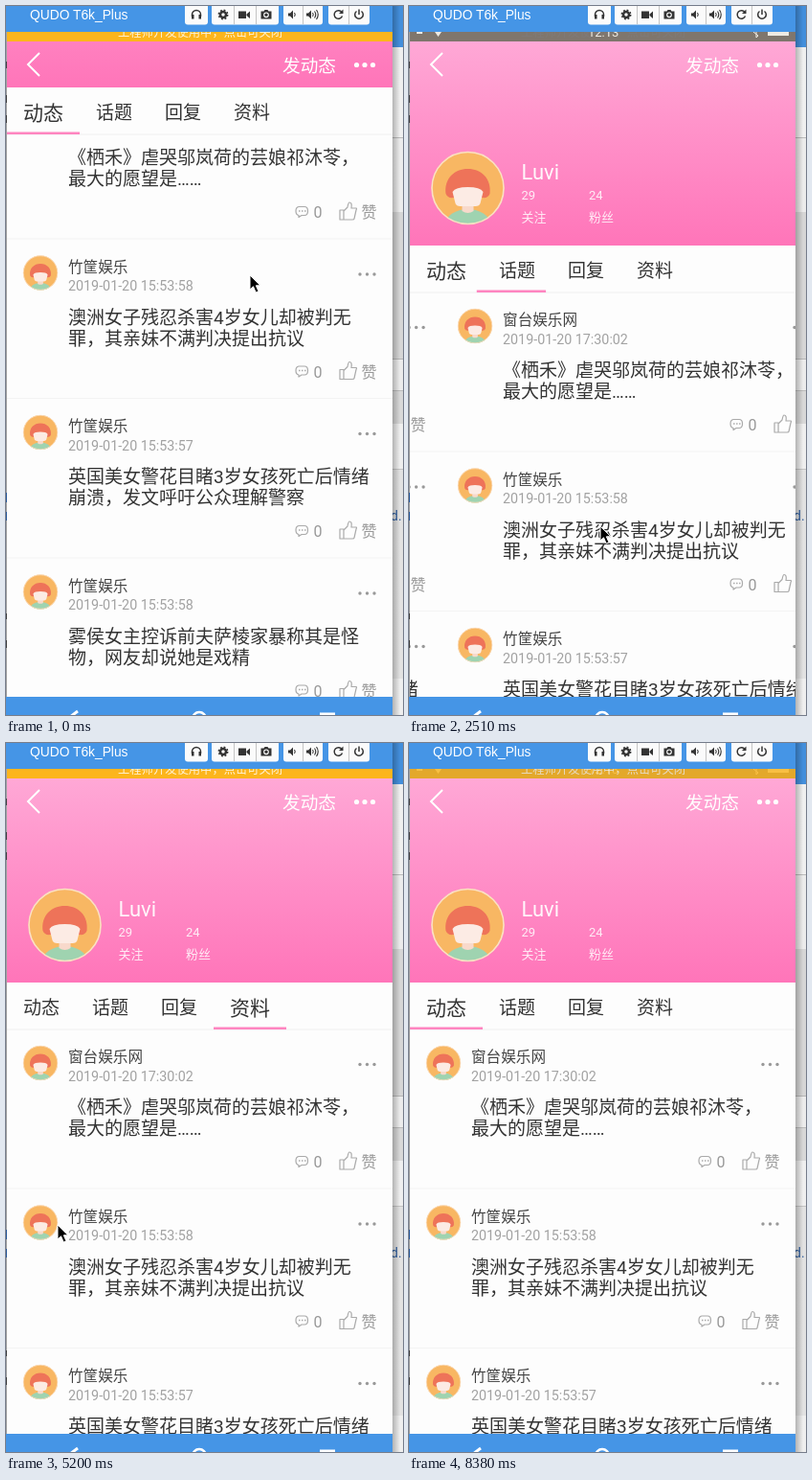
Animation of 415 by 740 pixels, one loop 8480 ms. Source, as an HTML page:

```html
<!DOCTYPE html>
<html lang="zh-CN">
<head>
<meta charset="utf-8">
<title>动态页</title>
<style>
html, body { margin: 0; width: 100%; height: 100%; overflow: hidden; background: #e9e9e9; }
svg { display: block; width: 415px; height: 740px; }
text { font-family: Roboto, "Noto Sans CJK SC", "Noto Sans CJK", sans-serif; }
.device { font: 13.8px "Liberation Sans", Arial, sans-serif; fill: #fff; }
.name { font-size: 15.6px; fill: #444; }
.date { font-size: 14.3px; fill: #a2a2a2; }
.title { font-size: 19px; fill: #333; }
.meta { fill: #999; font-size: 16px; }
.tab { fill: #333; font-size: 19px; }
.info { fill: #fff; fill-opacity: .85; font-size: 13px; }
.line { fill: none; stroke: #aaa; stroke-width: 1.2; stroke-linejoin: round; }
.btn { fill: #fbfbfb; }
.ico { fill: none; stroke: #333; stroke-width: 1.5; }
.solid { fill: #333; }
</style>
</head>
<body>
<svg viewBox="0 0 415 740" xmlns="http://www.w3.org/2000/svg">
  <defs>
    <linearGradient id="pink" x1="0" y1="0" x2="0" y2="1">
      <stop offset="0" stop-color="#ffa8d6"/>
      <stop offset="1" stop-color="#ff75b9"/>
    </linearGradient>
    <linearGradient id="shade">
      <stop offset="0" stop-opacity=".25"/>
      <stop offset="1" stop-opacity="0"/>
    </linearGradient>
    <clipPath id="screen"><path d="M1 27H404V721H1z"/></clipPath>
    <clipPath id="below"><path d="M1 37H404V721H1z"/></clipPath>
    <clipPath id="round"><circle r="38"/></clipPath>
    <g id="face">
      <circle r="38" fill="#f8b763"/>
      <g clip-path="url(#round)">
        <ellipse cy="37" rx="23" ry="15" fill="#9fd3b0"/>
        <path d="M-6 14H6V24Q0 28-6 24z" fill="#f8d9cb"/>
        <path d="M-23 6C-25-10-14-20 0-20S25-10 23 6Q21 11 15 10H-15Q-21 11-23 6z" fill="#ee7359"/>
        <path d="M-16 4Q-13-1 0-1T16 4L13 16Q12 19 8 19H-8Q-12 19-13 16z" fill="#fcebe4"/>
      </g>
      <circle r="37.5" fill="none" stroke="#fbe0c4" stroke-width="1.6"/>
    </g>
    <g id="actions">
      <path class="line" d="M306 132.500h6q3.500 0 3.500 4.500t-3.500 4.500h-3l-3 2v-2q-3-.5-3-4.500t3-4.500z"/>
      <path d="M306 137h1.500m1.500 0h1.500m1.500 0h1.500" stroke="#aaa" stroke-width="1.300"/>
      <text class="meta" x="321.500" y="144">0</text>
      <path class="line" d="M349 136h4v10h-4zM353 137l4-4q1-5 2-5q3 0 2 6h5q1 0 0 2l-2 9q0 1-2 1h-9"/>
      <text class="meta" x="371.500" y="144">赞</text>
      <g fill="#999"><circle cx="370" cy="36.500" r="1.700"/><circle cx="377.500" cy="36.500" r="1.700"/><circle cx="385" cy="36.500" r="1.700"/></g>
    </g>
  </defs>

  <!-- page behind the device window -->
  <g id="backdrop"></g>
  <text x="402" y="537" font-size="14" fill="#2f5f9f">d.</text>
  <path d="M404 0h8V740h-8z" fill="url(#shade)"/>
  <path d="M.5 27V721" stroke="#a3a3a3"/>
  <path d="M.5 58v7m0 28v8m0 13v8m0 512v6m0 22v8" stroke="#444"/>
  <path d="M.5 508v10m0 10v9" stroke="#2f5f9f"/>

  <path d="M0 0H404V27H0z" fill="#4595e6"/>
  <text class="device" x="25" y="14">QUDO T6k_Plus</text>
  <g class="btn">
    <rect x="187" y="-5" width="24" height="24.500" rx="3"/>
    <rect x="215" y="-5" width="70" height="24.500" rx="3"/>
    <rect x="290" y="-5" width="41" height="24.500" rx="3"/>
    <rect x="337" y="-5" width="43" height="24.500" rx="3"/>
  </g>
  <path d="M238.500 0V19M261.500 0V19M310.500 0V19M358.500 0V19" stroke="#c4c4c4"/>
  <path class="ico" d="M194.500 11V9a4.500 4.500 0 0 1 9 0v2"/>
  <path class="solid" d="M194 9h2.500v4.500H194zM201.500 9h2.500v4.500h-2.500z"/>
  <circle class="ico" cx="227" cy="9" r="3" style="stroke-width:2.500"/>
  <circle class="ico" cx="227" cy="9" r="4.700" stroke-dasharray="1.850 1.850"/>
  <path class="solid" d="M243 5.500h8v7.500h-8zM251.500 8.500l3.500-3v7.500l-3.500-3zM266.500 5.500h3l1-1.500h3l1 1.500h3V13.500h-11z"/>
  <circle cx="272" cy="9.300" r="2.300" fill="#333" stroke="#fff" stroke-width="1.100"/>
  <path class="solid" d="M295 7.500h2l3-3v9l-3-3h-2zM314 7.500h2l3-3v9l-3-3h-2z"/>
  <path class="ico" d="M301.500 7q1.500 2 0 4M320.500 7q1.500 2 0 4M322.500 5.500q2.500 3.500 0 7M324.500 4q3.500 5 0 10" style="stroke-width:1.100"/>
  <path class="ico" d="M351 6.500a4.300 4.300 0 1 0 .5 4"/>
  <path class="solid" d="M352.500 3.500v4.500H348z"/>
  <path class="ico" d="M366.500 5.500a4.300 4.300 0 1 0 5 0M369 3.500v5.500"/>

  <g clip-path="url(#screen)">
    <path d="M1 27H404V721H1z" fill="#fdfdfd"/>
    <g clip-path="url(#below)">
      <g id="list"></g>
      <rect id="head" x="1" width="403" fill="url(#pink)"/>
      <g id="profile">
        <use href="#face" x="61.500" y="190"/>
        <text x="117.500" y="181" font-size="22" fill="#fff" fill-opacity=".92">Luvi</text>
        <text class="info" x="117.500" y="201.500">29</text>
        <text class="info" x="188" y="201.500">24</text>
        <text class="info" x="117.500" y="225">关注</text>
        <text class="info" x="188" y="225">粉丝</text>
      </g>
      <g id="tabs">
        <path d="M1 250H404V299H1z" fill="#fdfdfd"/>
        <path d="M1 299H404" stroke="#f0f0f0"/>
        <rect id="bar" y="296.500" height="2.500" fill="#ff85c0"/>
      </g>
      <path d="M35 49L23 61L35 73" fill="none" stroke="#fff" stroke-width="2"/>
      <text x="289" y="69" font-size="18.700" fill="#fff">发动态</text>
      <g fill="#fff"><circle cx="366.500" cy="61.500" r="2.600"/><circle cx="375" cy="61.500" r="2.600"/><circle cx="383.500" cy="61.500" r="2.600"/></g>
    </g>
    <g>
      <path d="M1 27H404V37H1z" fill="#787372"/>
      <text x="187" y="31.500" font-size="13" fill="#eee">12:13</text>
      <path d="M375 27h22v4h-22zM8 27h6v2H8zM27 27h7l-3.500 5z" fill="#eee"/>
      <path d="M360 27l5 4-2 2V27" fill="none" stroke="#eee"/>
    </g>
    <g id="notice">
      <path d="M1 27H404V37H1z" fill="#fcb51c"/>
      <text x="117" y="31.500" font-size="12.300" fill="#fff3d6">工程师开发使用中，点击可关闭</text>
    </g>
  </g>

  <path d="M0 721H404V740H0z" fill="#4595e6"/>
  <path d="M75 736l-8 6l8 6" fill="none" stroke="#fff" stroke-width="3"/>
  <circle cx="202" cy="744" r="7" fill="none" stroke="#fff" stroke-width="2.500"/>
  <path d="M328 737.500H344V740H328z" fill="#fff"/>
  <path id="cursor" d="M0 0V15L3.500 11.800L6.200 18L9 16.800L6.300 10.800H11z" fill="#000" stroke="#fff"/>
</svg>
<script>
const $ = id => document.getElementById(id);
const LOOP = 8480, PAGE = 403, PITCH = 166.5, COLLAPSE = 165, SCROLL = 222;

// [bottom edge, colour] of the strip to the right
let edge = 0;
$('backdrop').innerHTML = [
  [43, '#438fdc'], [137, '#f0f0f0'], [138, '#bbb'], [215, '#ececec'],
  [368, '#d6d6d6'], [369, '#b5b5b5'], [401, '#ececec'], [402, '#bbb'], [436, '#d8d8d8'],
  [483, '#efefef'], [484, '#c4c4c4'], [702, '#e2e2e2'], [740, '#efefef']
].map(([end, fill]) => {
  const row = `<rect x="404" y="${edge}" width="11" height="${end - edge}" fill="${fill}"/>`;
  edge = end;
  return row;
}).join('');

const posts = [
  ['窗台娱乐网', '17:30:02', '《栖禾》虐哭邬岚荷的芸娘祁沐苓，', '最大的愿望是……'],
  ['竹筐娱乐', '15:53:58', '澳洲女子残忍杀害4岁女儿却被判无', '罪，其亲妹不满判决提出抗议'],
  ['竹筐娱乐', '15:53:57', '英国美女警花目睹3岁女孩死亡后情绪', '崩溃，发文呼吁公众理解警察'],
  ['竹筐娱乐', '15:53:58', '雾侯女主控诉前夫萨棱家暴称其是怪', '物，网友却说她是戏精']
];
const post = ([name, time, a, b], i) => `<g transform="translate(0 ${299 + i * PITCH})">
  <use href="#face" transform="translate(36 35) scale(.474)"/>
  <text class="name" x="65" y="34">${name}</text>
  <text class="date" x="65" y="53.5">2019-01-20 ${time}</text>
  <text class="title" x="65" y="88">${a}</text>
  <text class="title" x="65" y="110">${b}</text>
  <use href="#actions"/>
  <path d="M1 166H404" stroke="#f3f3f3"/></g>`;
const feed = posts.map(post).join('');
$('list').innerHTML = [0, 1, 2, 3].map(i => `<g transform="translate(${i * PAGE} 0)">${feed}</g>`).join('');

const labels = ['动态', '话题', '回复', '资料'].map(s => {
  const el = document.createElementNS('http://www.w3.org/2000/svg', 'text');
  el.textContent = s;
  el.setAttribute('class', 'tab');
  $('tabs').append(el);
  return el;
});

const clamp = (v, a = 0, b = 1) => Math.min(b, Math.max(a, v));
const smooth = u => u * u * (3 - 2 * u);
const linear = u => u;

// keys: [time, value...]; value held before the first and after the last
function track(keys, t, ease = smooth) {
  const n = keys.findIndex(k => k[0] > t);
  if (n === 0) return keys[0].slice(1);
  if (n < 0) return keys.at(-1).slice(1);
  const a = keys[n - 1], b = keys[n], u = ease((t - a[0]) / (b[0] - a[0]));
  return a.slice(1).map((v, i) => v + (b[i + 1] - v) * u);
}

const drag = [[200, 0], [1250, 256], [1420, 256], [1700, SCROLL]];
const swipe = [[2000, 0], [2300, .27], [2510, .918], [2700, 1], [3100, 1], [3450, 1.25],
  [3750, 2], [4580, 2], [4950, 2.68], [5180, 3], [6250, 3], [6600, 0]];
const settled = [[0, 0], [2700, 1], [3750, 2], [5180, 3], [6600, 0]];
const pointer = [[200, 255, 281], [1250, 250, 537], [1420, 250, 537], [1950, 310, 546],
  [2300, 200, 543], [2600, 200, 543], [3100, 330, 530], [3450, 228, 513], [4160, 228, 513],
  [4580, 330, 505], [4950, 54, 503], [5400, 54, 503], [6200, 56, 268], [7100, 56, 268],
  [8100, 200, 745]];
const notice = [[320, 1], [540, 0], [1000, 0], [1200, 1]];
const pace = [[0, 0], [1260, 6], [2300, 11], [2510, 12], [3540, 17], [3750, 18], [4790, 23],
  [4990, 24], [5830, 28], [6040, 29], [7080, 34], [7290, 35], [8110, 39], [8380, 40]];
const inverse = pace.map(([t, n]) => [n, t]);

const move = (id, x, y) => $(id).setAttribute('transform', `translate(${x} ${y})`);
const set = (el, attrs) => { for (const k in attrs) el.setAttribute(k, attrs[k]); };

function draw(now) {
  // steps fall on whole 10 ms, so allow a little slack
  const step = Math.floor(track(pace, now % LOOP, linear)[0] + .04);
  const t = track(inverse, step, linear)[0];

  const [d] = track(drag, t), [p] = track(swipe, t);
  const pull = Math.max(0, d - SCROLL) * .28;
  const shift = clamp(d - (SCROLL - COLLAPSE), 0, COLLAPSE) - COLLAPSE + pull;
  move('list', -p * PAGE, Math.min(d, SCROLL) - SCROLL + pull);
  move('tabs', 0, shift);
  move('profile', 0, shift);
  $('profile').setAttribute('opacity', clamp(1 + shift / 110));
  set($('head'), { y: 37 + Math.min(0, shift), height: 213 + Math.max(0, shift) });

  const sel = settled.filter(k => k[0] <= t).at(-1)[1];
  let x = 1;
  const spans = labels.map((el, i) => {
    const on = i === sel, w = on ? 76 : 72, left = x;
    set(el, { x: left + 17, y: on ? 283.5 : 282.5, style: `font-size:${on ? 21 : 19}px` });
    x += w;
    return [i, left, w];
  });
  const [left, w] = track(spans, p, linear);
  set($('bar'), { x: left, width: w });

  $('notice').setAttribute('opacity', track(notice, t % 2000)[0]);
  move('cursor', ...track(pointer, t));
}

let start;
function tick(now) {
  start ??= now;
  draw(now - start);
  requestAnimationFrame(tick);
}
draw(0);
requestAnimationFrame(tick);
</script>
</body>
</html>
```
